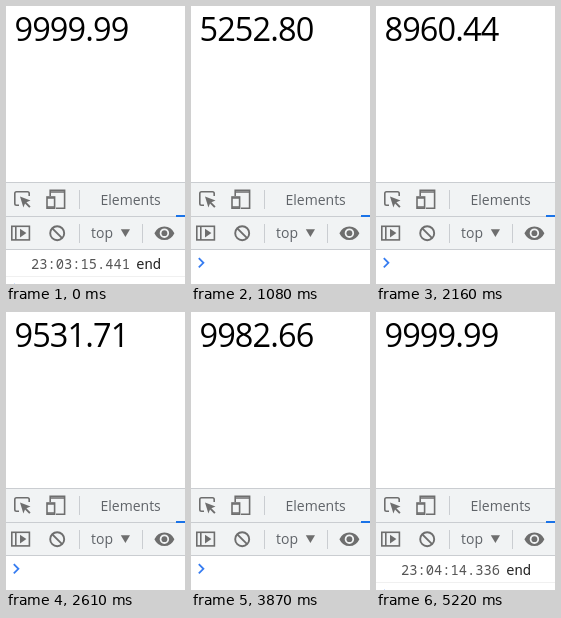
Animation of 179x278 px, one loop 6.09 s. Source, as an HTML page:

```html
<!DOCTYPE html>
<html lang="en">
<head>
<meta charset="utf-8">
<title>Counter</title>
<style>
  html, body { margin: 0; width: 100%; height: 100%; overflow: hidden; background: #fff; }
  svg { display: block; }
  .ui { font: 14px "Open Sans", "Noto Sans", sans-serif; fill: #5f6368; }
  .mono { font: 13.75px "Noto Sans Mono", "DejaVu Sans Mono", monospace; }
  #count { font: 32.5px "Open Sans", "Noto Sans", sans-serif; letter-spacing: -0.9px; }
  .icon { fill: none; stroke: #6e6e6e; stroke-width: 1.6; }
  .solid { fill: #6e6e6e; }
  .rule { fill: #cacdd1; }
</style>
</head>
<body>
<svg width="179" height="278" viewBox="0 0 179 278">
  <text id="count" x="8.5" y="35.2">9999.99</text>

  <!-- toolbars -->
  <rect y="176" width="179" height="68" fill="#f1f3f4"/>
  <g class="rule">
    <rect y="176" width="179" height="1"/>
    <rect y="210" width="179" height="1"/>
    <rect y="243" width="179" height="1"/>
    <rect x="73" y="184" width="1" height="19"/>
    <rect x="73" y="218" width="1" height="19"/>
    <rect x="136" y="218" width="1" height="19"/>
  </g>
  <rect x="170" y="209" width="9" height="2" fill="#1a73e8"/>

  <!-- inspect -->
  <path class="icon" d="M13 199.2H10.5Q8.8 199.2 8.8 197.5V187.5Q8.8 185.8 10.5 185.8H21.5Q23.2 185.8 23.2 187.5V190"/>
  <path class="solid" d="M14 190.5L24.5 194.6L20.4 196.2L24.6 200.4L23.2 201.8L19 197.6L17.4 201.5Z"/>

  <!-- device -->
  <path class="icon" d="M44.2 190V184.2H58.6V202.2H50"/>
  <rect class="icon" x="41" y="191" width="7.6" height="11.2"/>
  <path class="icon" d="M44.2 186H58.6M41 192H48.6M41 201H48.6"/>

  <!-- sidebar -->
  <rect class="icon" x="5.8" y="220.3" width="17.6" height="13.6"/>
  <path class="icon" d="M9.8 220V234"/>
  <path class="solid" d="M14 222.8L20.4 227.1L14 231.4Z"/>

  <!-- clear -->
  <circle class="icon" cx="51.2" cy="227.2" r="7" style="stroke-width:1.9"/>
  <path class="icon" d="M46.3 222.3L56.1 232.1" style="stroke-width:1.9"/>

  <path class="solid" d="M114.8 223.3H124L119.4 231Z"/>

  <!-- eye -->
  <path class="solid" fill-rule="evenodd" d="M148.4 227.2Q151.5 220.4 158.4 220.4T168.4 227.2Q165.300 234 158.4 234T148.4 227.200ZM158.4 222.500A4.700 4.700 0 1 0 158.4 231.900A4.700 4.700 0 1 0 158.4 222.500Z"/>
  <circle class="solid" cx="158.4" cy="227.2" r="2.9"/>

  <text class="ui" x="94.500" y="199">Elements</text>
  <text class="ui" x="85" y="232">top</text>

  <!-- console -->
  <g id="log">
    <text id="stamp" class="mono" x="25" y="263" fill="#545454"></text>
    <text class="mono" x="130.3" y="263" fill="#222">end</text>
    <rect y="270" width="179" height="1" fill="#f0f0f0"/>
  </g>
  <path id="prompt" d="M7.800 252.200L12.400 256.800L7.800 261.400" fill="none" stroke="#367cf1" stroke-width="1.8"/>
</svg>
<script>
  const LOOP = 6090, STEP = 30, CLEAR = 360, DONE = 5220, GOAL = 9999.99;
  const ROW = 26;

  // time and value; between them the value eases out as a fifth power
  const marks = [
    [413, 0], [1080, 5252.80], [1710, 7932.39], [2610, 9531.71],
    [3300, 9898.78], [4500, 9999.25], [5205, GOAL]
  ].map(([t, v]) => [t, Math.pow((GOAL - v) / GOAL, 0.2)]);

  const $ = id => document.getElementById(id);
  const count = $("count"), log = $("log"), stamp = $("stamp"), prompt = $("prompt");

  function valueAt(t) {
    if (t < marks[0][0]) return GOAL;
    const i = marks.findIndex(m => m[0] > t);
    if (i < 0) return GOAL;
    const [t0, r0] = marks[i - 1], [t1, r1] = marks[i];
    const rest = r0 + (r1 - r0) * (t - t0) / (t1 - t0);
    return GOAL * (1 - Math.pow(rest, 5));
  }

  function draw(ms) {
    const t = Math.floor((ms % LOOP) / STEP) * STEP;
    const logged = t < CLEAR || t >= DONE;
    count.textContent = valueAt(t).toFixed(2);
    stamp.textContent = t < CLEAR ? "23:03:15.441" : "23:04:14.336";
    log.setAttribute("visibility", logged ? "visible" : "hidden");
    prompt.setAttribute("transform", `translate(0 ${logged ? ROW : 0})`);
  }

  const start = performance.now();
  function tick() {
    draw(performance.now() - start);
    requestAnimationFrame(tick);
  }
  draw(0);
  requestAnimationFrame(tick);
</script>
</body>
</html>
```
